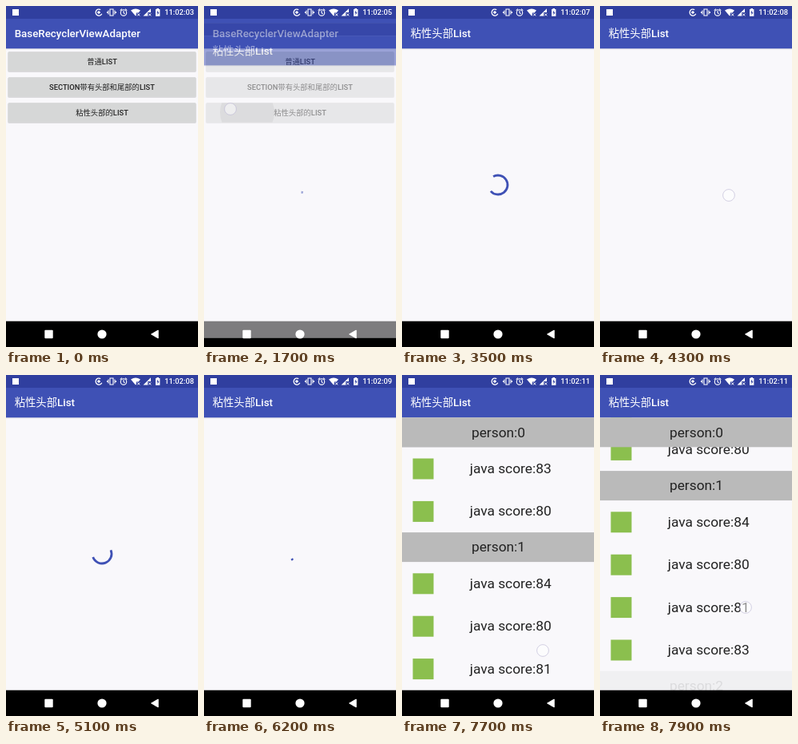
Write an HTML page that moves like this. It is 240x427 px and loops after 8 s.

```html
<!DOCTYPE html>
<html lang="zh">
<head>
<meta charset="utf-8">
<title>BaseRecyclerViewAdapter</title>
<style>
html, body { margin: 0; width: 100%; height: 100%; overflow: hidden; background: #000; }
svg { display: block; width: 100%; height: 100%; }
text { font-family: Roboto, 'Noto Sans CJK SC', 'Noto Sans CJK', sans-serif; }
.title { font-size: 13.33px; font-weight: 500; fill: #fff; }
.btn { font-size: 9.33px; font-weight: 500; fill: #222; text-anchor: middle; }
.row { font-size: 17.33px; fill: #222; text-anchor: middle; }
.clock { font-size: 9.33px; font-weight: 500; fill: #fff; text-anchor: end; }
.line { fill: none; stroke: #fff; }
</style>
</head>
<body>
<svg viewBox="0 0 240 427" preserveAspectRatio="none">
  <defs>
    <clipPath id="content"><rect y="53.3" width="240" height="341.4"/></clipPath>
    <clipPath id="pressed"><rect x="2.7" y="121.3" width="234.6" height="24.5" rx="1.3"/></clipPath>
  </defs>

  <g id="home"></g>
  <circle id="ripple" cy="133.3" fill="#000" fill-opacity=".1" clip-path="url(#pressed)"/>

  <g id="page">
    <g id="pageFrame"></g>
    <path id="spinner" fill="none" stroke="#3f51b5" stroke-width="2.8"/>
    <g id="list" clip-path="url(#content)">
      <g id="rows"></g>
      <g id="sticky"></g>
    </g>
  </g>

  <g id="statusBar" fill="#fff">
    <rect x="8" y="4" width="8" height="8"/>
    <path class="line" stroke-width="1.3" d="M118.2 4.6A4 4 0 1 0 119.8 9.7M116 6v4M114 8h4"/>
    <path class="line" stroke-width="1.1" d="M130 4h4v8h-4zM128 5.5v5M136 5.5v5M126.6 7v2M137.4 7v2"/>
    <circle class="line" cx="147" cy="8.4" r="3.7" stroke-width="1.1"/>
    <path class="line" stroke-width="1.1" d="M147 6v2.6l1.7 1.1M142.7 5.6l2.2-1.9M151.3 5.6l-2.2-1.9"/>
    <path d="M156 5.6Q162 1.6 168 5.6L165.6 8.4H162.8V11.7L162 12.6z"/>
    <path class="line" stroke-width="1" d="M164.2 9.4l3 3M167.2 9.4l-3 3"/>
    <path d="M171.5 12.5L181 3.2V8H177.2V12.5z"/>
    <path class="line" stroke-width="1" d="M178.2 9.4l3 3M181.2 9.4l-3 3"/>
    <path d="M187 4h1.4V3h2.6v1h1.4v8.7H187z"/>
    <path d="M190.2 5.4l-2 3.2h1.3v2.6l2-3.3h-1.3z" fill="#303f9f"/>
    <text id="clock" class="clock" x="235" y="11.3"></text>
  </g>

  <g fill="#fff">
    <rect x="48.3" y="405.8" width="10.4" height="10.4" rx="1"/>
    <circle cx="120" cy="411" r="5.6"/>
    <path d="M181.6 411L190.2 406V416z" stroke="#fff" stroke-linejoin="round"/>
  </g>
  <circle id="touch" r="7.4" fill="#fff" fill-opacity=".5" stroke="#bdb8d4" stroke-opacity=".7" stroke-width=".9"/>
</svg>

<script>
const LOOP = 8000, STEP = 100;
const TOP = 53.3, HEAD = 37, ROW = 53.4;
const OPEN = 1668, FAIL = 3900, RETRY = 4810, LOADED = 6590, DRAG = 7700;
const $ = id => document.getElementById(id);
const clamp = v => Math.min(1, Math.max(0, v));
const set = (el, attrs) => { for (const k in attrs) el.setAttribute(k, attrs[k]); };
const show = (el, on) => { el.style.display = on ? '' : 'none'; };

const rect = (x, y, w, h, fill, extra = '') =>
  `<rect x="${x}" y="${y}" width="${w}" height="${h}" fill="${fill}" ${extra}/>`;
const label = (cls, x, y, s) => `<text class="${cls}" x="${x}" y="${y}">${s}</text>`;

const frame = title =>
  rect(0, 0, 240, 395, '#f9f8fb') +
  rect(0, TOP, 240, 1, '#000', 'opacity=".1"') +
  rect(0, 0, 240, 16, '#303f9f') +
  rect(0, 16, 240, TOP - 16, '#3f51b5') +
  rect(0, 394.7, 240, 33, '#000') +
  label('title', 10.7, 39.4, title);

const button = (s, i) => {
  const y = 57.3 + i * 32;
  return rect(2.2, y + .2, 235.6, 25.4, '#000', 'rx="1.6" opacity=".12"') +
    rect(2.7, y, 234.6, 24.5, '#d6d7d7', 'rx="1.3"') +
    label('btn', 120, y + 15.4, s);
};

const header = (y, n) => rect(0, y, 240, HEAD, '#bababa') + label('row', 120.5, y + 24.3, 'person:' + n);
const score = (y, n) => rect(13.5, y + 14.2, 26, 26, '#8bbf4e') + label('row', 135.7, y + 32.6, 'java score:' + n);

function buildRows() {
  let y = TOP, out = '';
  [[83, 80], [84, 80, 81, 83], []].forEach((scores, n) => {
    out += `<g id="person${n}">${header(y, n)}</g>`;
    y += HEAD;
    for (const s of scores) {
      out += score(y, s);
      y += ROW;
    }
  });
  return out;
}

$('home').innerHTML = frame('BaseRecyclerViewAdapter') +
  ['普通LIST', 'SECTION带有头部和尾部的LIST', '粘性头部的LIST'].map(button).join('');
$('pageFrame').innerHTML = frame('粘性头部List');
$('rows').innerHTML = buildRows();
$('sticky').innerHTML = header(TOP, 0);

// cubic-bezier(.4, 0, .2, 1)
function ease(x) {
  let lo = 0, hi = 1, s = .5;
  for (let i = 0; i < 24; i++) {
    s = (lo + hi) / 2;
    const bx = 1.2 * s * (1 - s) ** 2 + .6 * s * s * (1 - s) + s ** 3;
    if (bx < x) lo = s; else hi = s;
  }
  return 3 * s * s * (1 - s) + s ** 3;
}

// Indeterminate ring: the end runs ahead, then the start catches up, while all rotates
function arc(time) {
  const u = time % 1333 / 1333;
  const base = u / 4 + time * 2 / 4444;
  const from = base + .75 * ease(clamp(u * 2 - 1));
  const to = Math.max(base + .75 * ease(clamp(u * 2)), from + .03);
  const point = turn => {
    const a = turn * 2 * Math.PI;
    return (120 + 12 * Math.sin(a)).toFixed(2) + ' ' + (224 - 12 * Math.cos(a)).toFixed(2);
  };
  return `M${point(from)}A12 12 0 ${to - from > .5 ? 1 : 0} 1 ${point(to)}`;
}

function touchAt(t) {
  if (t >= 1500 && t <= 1700) return [33, 129];
  if (t >= 4200 && t < 4400) return [161, 237];
  if (t >= 7600) {
    const p = clamp((t - DRAG) / 200);
    return [176 + 6 * p, 345 - 54 * p ** 1.3];
  }
  return null;
}

function draw(t) {
  $('clock').textContent = '11:02:' + String(3 + Math.floor((t + 700) / 1000)).padStart(2, '0');

  const press = clamp((t - 1500) / 200);
  show($('ripple'), t > 1500 && t < 2000);
  set($('ripple'), { cx: 33 + 21 * press, r: 34 * press });

  const opened = t - OPEN;
  show($('page'), opened > 0);
  set($('page'), {
    opacity: 1 - (1 - clamp(opened / 200)) ** 4,
    transform: `translate(0 ${34.1 * (1 - clamp(opened / 350)) ** 5})`
  });

  const since = t < FAIL ? opened : t < LOADED ? t - RETRY : -1;
  show($('spinner'), since >= 0);
  if (since >= 0) set($('spinner'), { d: arc(since) });

  show($('list'), t >= LOADED);
  set($('rows'), {
    opacity: clamp((t - LOADED) / 300),
    transform: `translate(0 ${-77 * clamp((t - DRAG) / 200) ** 1.3})`
  });
  set($('person2'), { opacity: clamp((t - 7860) / 300) });

  const spot = touchAt(t);
  show($('touch'), spot);
  if (spot) set($('touch'), { cx: spot[0], cy: spot[1] });
}

const start = performance.now();
function tick() {
  const t = (performance.now() - start) % LOOP;
  draw(Math.floor(t / STEP) * STEP);
  requestAnimationFrame(tick);
}
tick();
</script>
</body>
</html>
```
